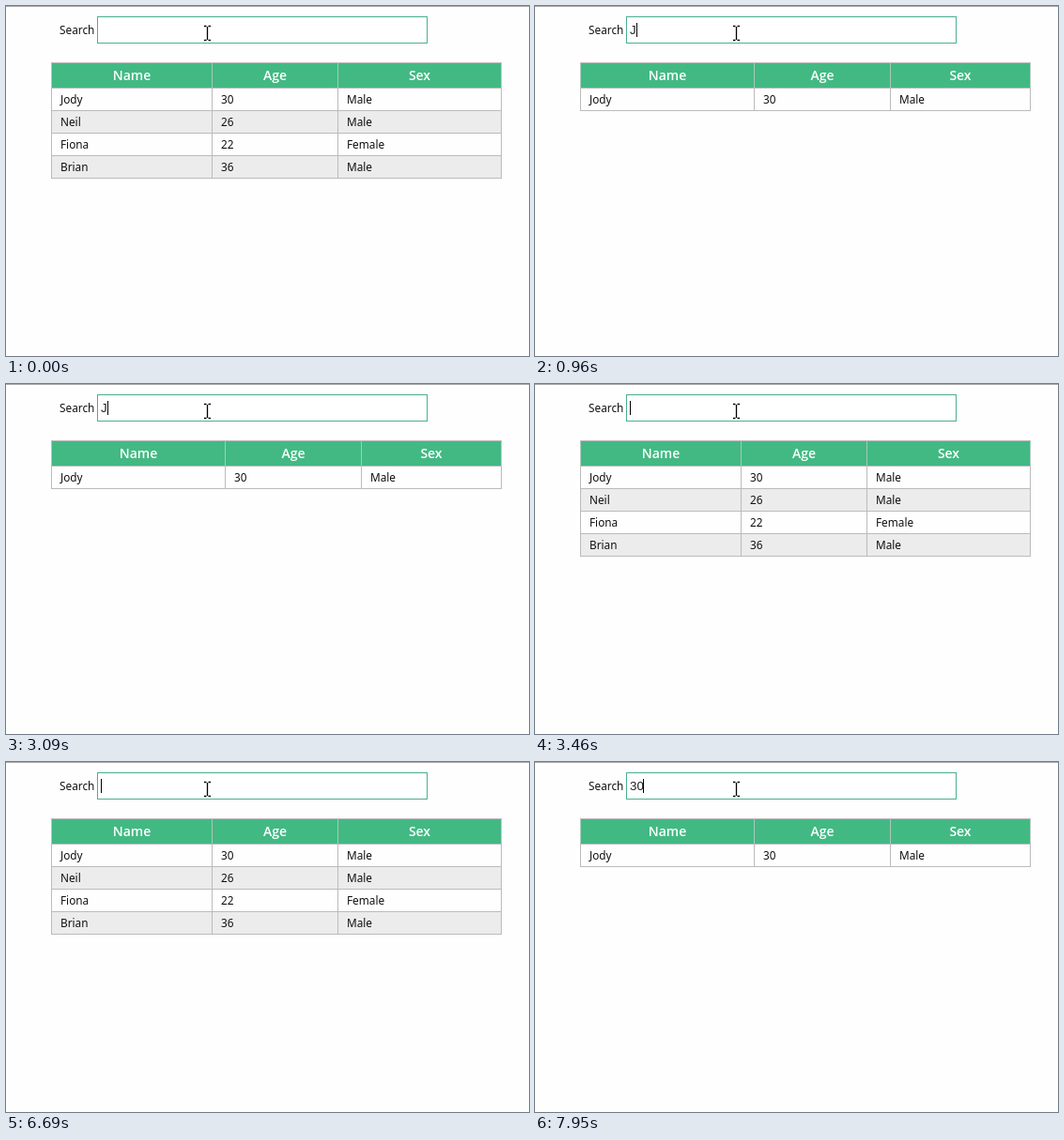
Animation, 557 px wide and 373 px high, one loop 8 s. Source, as an HTML page:

```html
<!DOCTYPE html>
<html lang="en">
<head>
<meta charset="utf-8">
<title>Searchable table</title>
<style>
  html, body { margin: 0; width: 100%; height: 100%; overflow: hidden; background: #fefefe; }
  svg { display: block; width: 557px; height: 373px; }
  text { font: 11.8px "Noto Sans", "Open Sans", sans-serif; fill: #111; }
  .head { font: 600 14px "Open Sans", "Noto Sans", sans-serif; fill: #fff; text-anchor: middle; }
  .typed { font: 13.333px "Liberation Sans", Arial, sans-serif; fill: #222; }
  .box { fill: #fff; stroke: #4bae92; }
  .line { stroke: #bbb; fill: none; }
  .split { stroke: #a9c9b9; }
</style>
</head>
<body>
<svg viewBox="0 0 557 373">
  <path d="M0 .5H557" stroke="#aaa"/>
  <text x="57" y="30">Search</text>
  <rect class="box" x="97.5" y="11.5" width="351" height="28"/>
  <text id="query" class="typed" x="101" y="30"></text>
  <rect id="caret" y="18" width="1" height="15" fill="#000"/>
  <g id="table"></g>
  <path d="M211 21.5H213.5M215.5 21.5H218M211 36.5H213.5M215.5 36.5H218M214.5 22V36" fill="none" stroke="#000" stroke-width="1.3"/>
</svg>
<script>
const LOOP = 8000, ROW = 24, TOP = 60, BODY = 87;
const titles = ["Name", "Age", "Sex"];
const people = [
  ["Jody", "30", "Male"],
  ["Neil", "26", "Male"],
  ["Fiona", "22", "Female"],
  ["Brian", "36", "Male"]
];

// [start ms, query, caret visible]
const steps = [
  [0, "", 0], [500, "", 1],
  [960, "J", 1], [1110, "Jo", 1], [1670, "Jod", 1], [1980, "Jody", 1],
  [2540, "Jod", 1], [2660, "Jo", 1], [3090, "J", 1], [3460, "", 1],
  [4020, "", 0], [4450, "", 1], [5010, "", 0], [5540, "", 1], [6100, "", 0],
  [6690, "", 1], [6810, "3", 1], [7240, "3", 0], [7830, "3", 1], [7950, "30", 1]
];

const el = id => document.getElementById(id);
const text = (x, y, s, cls = "") => `<text class="${cls}" x="${x}" y="${y}">${s}</text>`;
const rect = (y, h, fill) => `<rect x="48" y="${y}" width="480" height="${h}" fill="${fill}"/>`;
const path = (cls, d) => `<path class="${cls}" d="${d}"/>`;

function drawTable(query) {
  const rows = people.filter(p => p.some(v => v.includes(query)));
  const cols = rows.length === people.length ? [48, 219, 353, 527] : [48, 233, 378, 527];
  const bottom = BODY + rows.length * ROW;
  let out = rect(TOP, BODY - TOP, "#42b983");
  rows.forEach((row, i) => {
    const y = BODY + i * ROW;
    out += rect(y, ROW, i % 2 ? "#ececec" : "#fefefe");
    row.forEach((v, c) => out += text(cols[c] + 10, y + 17, v));
    out += path("line", `M48 ${y + .5}H528`);
  });
  titles.forEach((s, c) => out += text((cols[c] + cols[c + 1] + 1) / 2, 79, s, "head"));
  cols.forEach(x => {
    out += path("line split", `M${x + .5} ${TOP}V${BODY}`);
    out += path("line", `M${x + .5} ${BODY}V${bottom + 1}`);
  });
  out += path("line", `M48 ${TOP + .5}H528M48 ${bottom + .5}H528`);
  el("table").innerHTML = out;
}

let shown = null;
function show(step) {
  if (step === shown) return;
  const [, query, caret] = step;
  if (!shown || shown[1] !== query) {
    el("query").textContent = query;
    el("caret").setAttribute("x", 101 + 7 * query.length);
    drawTable(query);
  }
  el("caret").setAttribute("opacity", caret);
  shown = step;
}

const start = performance.now();
function tick() {
  const t = (performance.now() - start) % LOOP;
  show(steps.findLast(s => s[0] <= t));
  requestAnimationFrame(tick);
}
tick();
</script>
</body>
</html>
```
